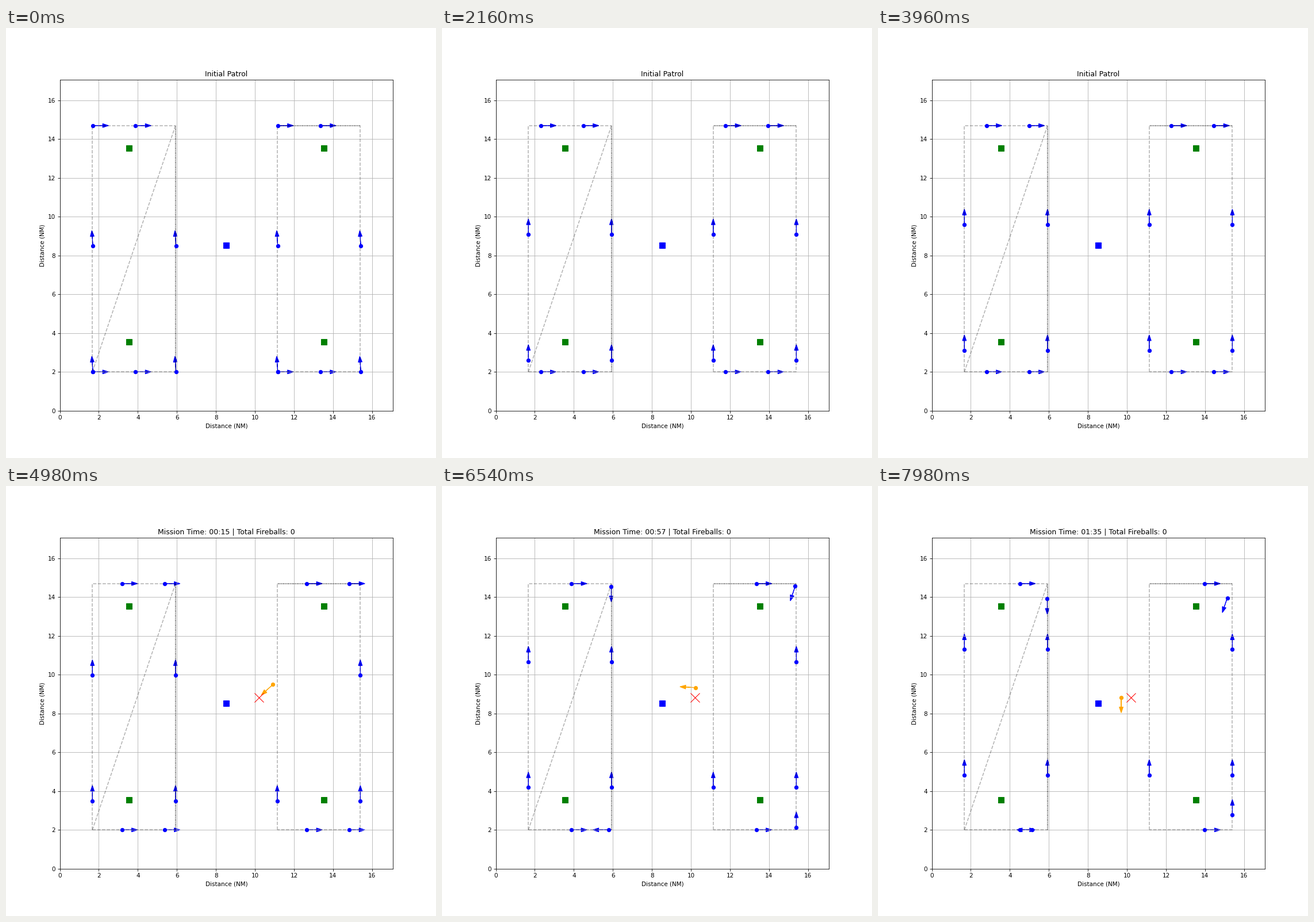
Animation, 748 px wide and 748 px high, one loop 8000 ms. Source, as a matplotlib script:

```python
import math

import matplotlib.pyplot as plt
import numpy as np
from matplotlib.animation import FuncAnimation
from matplotlib.collections import PolyCollection

SIZE = 748
INCHES = 10
TICK = 20                 # ms per animation frame
HOLD = 3                  # frames per simulation step
FRAMES = 400
CALL = 73                 # last step of the initial patrol
DT = 1.6                  # seconds per step once the mission runs
KNOT = 60 / 3600          # patrol speed, NM per second

EXTENT = 10 + 5 * math.sqrt(2)
NEAR = 2.5 * math.sqrt(2)
FAR = NEAR + 10
BOTTOM, TOP = 2.0, 14.7
WIDTH = 4.257
LEFTS = (1.672, 11.141)
START = 0.027             # initial drift to the east
CASUALTY = np.array([10.204, 8.838])
ORBIT = 0.5

fig, ax = plt.subplots(figsize=(INCHES, INCHES), dpi=SIZE / INCHES)
ax.set_xlim(0, EXTENT)
ax.set_ylim(0, EXTENT)
ax.set_xlabel("Distance (NM)")
ax.set_ylabel("Distance (NM)")
ax.grid(True)
title = ax.set_title("Initial Patrol")


def corners(left):
    right = left + WIDTH
    return (left, BOTTOM), (left, TOP), (right, TOP), (right, BOTTOM)


def dashed(*points):
    ax.plot(*zip(*points), "k--", alpha=0.3)


bl, tl, tr, br = corners(LEFTS[0])
dashed(bl, tl, tr, br, bl)
dashed(bl, tr, br)
bl, tl, tr, br = corners(LEFTS[1])
dashed(bl, tl, tr, br, bl)
dashed(tr, tl)

ax.plot([NEAR, NEAR, FAR, FAR], [NEAR, FAR, NEAR, FAR], "gs", markersize=10)
ax.plot([EXTENT / 2], [EXTENT / 2], "bs", markersize=10)


def build_routes():
    """Horizontal routes turn at a corner; climbers keep to one side."""
    level, climb = [], []
    for i, left in enumerate(LEFTS):
        bl, tl, tr, br = corners(left)
        turn = tr[0] - 0.012
        after_top = (turn, BOTTOM) if i == 0 else bl
        after_low = bl if i == 0 else tr
        low_turn = turn if i == 0 else tr[0]
        for gap in (0, 2.182):
            x = left + START + gap
            level.append([(x, TOP), (turn, TOP), after_top])
            level.append([(x, BOTTOM), (low_turn, BOTTOM), after_low])
        for x in (left, br[0]):
            climb += [(x, 2.01), (x, 8.489)]
    return level, climb


LEVEL, CLIMB = build_routes()
RESCUER = CLIMB.index((LEFTS[1], 8.489))


def travelled(step):
    return (min(step, CALL) + DT * max(step - CALL, 0)) * KNOT


def follow(route, dist):
    """Position and unit heading after moving dist along a route."""
    for a, b in zip(route, route[1:]):
        a, b = np.array(a), np.array(b)
        length = np.hypot(*(b - a))
        heading = (b - a) / length
        if dist <= length:
            break
        dist -= length
    return a + heading * dist, heading


def ascend(start, step):
    drift = START * math.exp(-step / 6)
    heading = np.array([-2.6 * drift, 1.0])
    pos = np.array([start[0] + drift, start[1] + travelled(step)])
    return pos, heading / np.hypot(*heading)


def rescue(step):
    """Fly straight to the orbit, then circle the casualty."""
    x, y = CLIMB[RESCUER]
    gap = np.array([x, y + travelled(CALL)]) - CASUALTY
    radius = np.hypot(*gap)
    angle = math.atan2(gap[1], gap[0])
    arrive = 97.7
    if step < arrive:
        part = (step - CALL) / (arrive - CALL)
        return CASUALTY + gap * (1 + (ORBIT / radius - 1) * part), -gap / radius
    angle += math.radians(3.89) * (step - arrive)
    out = np.array([math.cos(angle), math.sin(angle)])
    return CASUALTY + ORBIT * out, np.array([-out[1], out[0]])


ARROW = np.array([(0, 0.0005), (0.5, 0.0005), (0.5, 0.1), (0.8, 0),
                  (0.5, -0.1), (0.5, -0.0005), (0, -0.0005)])


def arrow(pos, heading):
    side = np.array([-heading[1], heading[0]])
    return pos + ARROW[:, :1] * heading + ARROW[:, 1:] * side


arrows = PolyCollection([], linewidths=1, joinstyle="miter", zorder=1)
ax.add_collection(arrows, autolim=False)
cross, = ax.plot([], [], "rx", markersize=15)
dots, = ax.plot([], [], "bo", markersize=6)
saver, = ax.plot([], [], "o", color="orange", markersize=6)


def update(frame):
    step = frame // HOLD
    mission = step > CALL
    craft = [follow(route, travelled(step)) for route in LEVEL]
    craft += [ascend(start, step) for i, start in enumerate(CLIMB)
              if not (mission and i == RESCUER)]
    dots.set_data(*zip(*(pos for pos, _ in craft)))
    colors = ["blue"] * len(craft)

    if mission:
        craft.append(rescue(step))
        colors.append("orange")
        pos = craft[-1][0]
        saver.set_data([pos[0]], [pos[1]])
        cross.set_data([CASUALTY[0]], [CASUALTY[1]])
        clock = int((step - CALL) * DT - 1e-6)
        title.set_text(f"Mission Time: {clock // 60:02d}:{clock % 60:02d}"
                       " | Total Fireballs: 0")
    else:
        saver.set_data([], [])
        cross.set_data([], [])
        title.set_text("Initial Patrol")

    arrows.set_verts([arrow(*c) for c in craft])
    arrows.set_color(colors)
    return arrows, cross, dots, saver, title


anim = FuncAnimation(fig, update, frames=FRAMES, interval=TICK,
                     init_func=lambda: update(0), repeat=True, repeat_delay=0)
plt.show()
```
